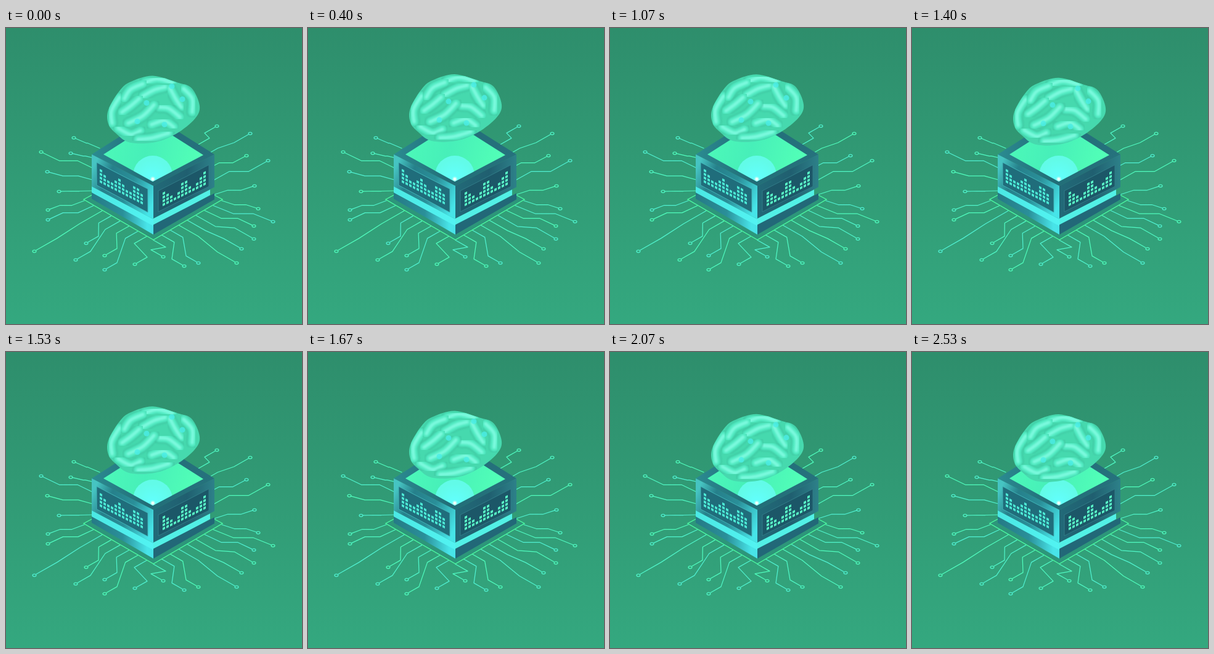
An HTML page that plays this animation: 480 px wide and 480 px high, repeating every 2590 ms.

```html
<!DOCTYPE html>
<html lang="en">
<head>
<meta charset="utf-8">
<title>Brain over a processor</title>
<style>
html, body { margin: 0; width: 100%; height: 100%; overflow: hidden; background: #319b76; }
svg { display: block; width: 100vw; height: 100vh; }
.line { fill: none; stroke-linecap: round; stroke-linejoin: round; }
</style>
</head>
<body>
<svg viewBox="0 0 480 480">
  <defs>
    <linearGradient id="bg" x2="0" y2="1">
      <stop stop-color="#2e8e6c"/><stop offset="1" stop-color="#34a87f"/>
    </linearGradient>
    <linearGradient id="rim">
      <stop stop-color="#2b8b91"/><stop offset=".45" stop-color="#226d78"/><stop offset="1" stop-color="#26727d"/>
    </linearGradient>
    <linearGradient id="left" y1=".25" y2=".75">
      <stop stop-color="#46c4c2"/><stop offset=".25" stop-color="#26808b"/>
      <stop offset=".6" stop-color="#2a8f99"/><stop offset="1" stop-color="#46e4e8"/>
    </linearGradient>
    <linearGradient id="right">
      <stop stop-color="#226a78"/><stop offset=".55" stop-color="#205f70"/><stop offset="1" stop-color="#2d8189"/>
    </linearGradient>
    <linearGradient id="strip">
      <stop stop-color="#4be8e4"/><stop offset="1" stop-color="#52f3f2"/>
    </linearGradient>
    <linearGradient id="slab">
      <stop stop-color="#257a86"/><stop offset=".5" stop-color="#2a8f99"/><stop offset=".9" stop-color="#48e4e8"/>
    </linearGradient>
    <linearGradient id="well" x2="1" y2=".2">
      <stop stop-color="#4dfbb8"/><stop offset=".5" stop-color="#47efb9"/><stop offset="1" stop-color="#52ffb7"/>
    </linearGradient>
    <radialGradient id="glow" cy=".6">
      <stop stop-color="#62ffff"/><stop offset="1" stop-color="#62fbe8"/>
    </radialGradient>
    <radialGradient id="spark">
      <stop stop-color="#fff"/><stop offset=".35" stop-color="#e7fff8"/><stop offset="1" stop-color="#9ffff0" stop-opacity="0"/>
    </radialGradient>
    <filter id="soft" x="-20%" y="-20%" width="140%" height="140%"><feGaussianBlur stdDeviation="1.5"/></filter>
    <clipPath id="opening"><path d="M158 205L238 154 320 206 238 249Z"/></clipPath>
    <clipPath id="skull"><path id="outline"/></clipPath>
  </defs>

  <rect width="480" height="480" fill="url(#bg)"/>
  <g id="wires" class="line" stroke-width="1.25"></g>
  <path d="M139 271L126 278 239 343.5 351 278 338 271" fill="#2d967a" stroke="#4dfba2" stroke-width="1.4"/>

  <path d="M139 205L238 142 338 205 239 256Z" fill="url(#rim)"/>
  <g clip-path="url(#opening)">
    <rect x="155" y="150" width="170" height="105" fill="url(#well)"/>
    <circle cx="238" cy="239" r="32" fill="url(#glow)"/>
    <circle cx="238" cy="245" r="5" fill="url(#spark)"/>
  </g>
  <path d="M139 205L239 256V310L139 257Z" fill="url(#left)"/>
  <path d="M139 257L239 310V322L139 267Z" fill="url(#strip)"/>
  <path d="M139 267L239 321V335L139 277Z" fill="url(#slab)"/>
  <path d="M239 256L338 205V258L239 309Z" fill="url(#right)"/>
  <path d="M239 309L331 262V271L239 321Z" fill="#52f0e6"/>
  <path d="M239 319L338 268V278L239 335Z" fill="#226878"/>
  <path d="M147 218L230 261V299L147 255Z" fill="#206d7b" stroke="#43b9bc" stroke-width=".9"/>
  <path d="M247 264L329 222V257L247 298Z" fill="#1c5768" stroke="#347f8b" stroke-width=".9"/>
  <g id="ledsL" transform="matrix(1 .51 0 1 152 228.5)" fill="#4ce9d5"></g>
  <g id="ledsR" transform="matrix(1 -.5 0 1 254 267)" fill="#58f6c6"></g>
  <g id="brain"></g>
</svg>

<script>
const LOOP = 2590, STEP = 200 / 3;
const $ = id => document.getElementById(id);
const lerp = (a, b, f) => a + (b - a) * f;
const parse = text => text.split(' ').map(p => p.split(',').map(Number));

function add(parent, tag, attrs) {
  const el = document.createElementNS('http://www.w3.org/2000/svg', tag);
  for (const key in attrs) el.setAttribute(key, attrs[key]);
  return parent.appendChild(el);
}

// Smooth curve through points
function curve(text, closed) {
  const pts = parse(text), n = pts.length;
  const at = i => closed ? pts[(i + n) % n] : pts[Math.max(0, Math.min(n - 1, i))];
  let d = 'M' + pts[0];
  for (let i = 0; i < (closed ? n : n - 1); i++) {
    const [a, b, c, e] = [at(i - 1), at(i), at(i + 1), at(i + 2)];
    const p = [0, 1].map(k => b[k] + (c[k] - a[k]) / 6);
    const q = [0, 1].map(k => c[k] - (e[k] - b[k]) / 6);
    d += `C${p} ${q} ${c}`;
  }
  return d + (closed ? 'Z' : '');
}

// A wire leaves its node and meets the board on isometric slants, joined by one middle leg
const wires = [];
function fan(nodes, from, to) {
  const ends = parse(nodes);
  ends.forEach(([x, y], i) => {
    const [ax, ay] = [0, 1].map(k => lerp(from[k], to[k], i / (ends.length - 1)));
    const run = Math.max(20, Math.abs(ax - x) / 3);
    const slope = Math.min(.57, Math.abs(ay - y) / run / 2);
    const u = run * Math.sign(ax - x), v = run * slope * Math.sign(ay - y);
    const g = add($('wires'), 'g', {});
    add(g, 'path', { d: `M${x + 3 * Math.sign(u)} ${y + v / run * 3}L${x + u} ${y + v} ${ax - u} ${ay - v} ${ax} ${ay}` });
    add(g, 'ellipse', { cx: x, cy: y, rx: 2.9, ry: 2 });
    wires.push(g);
  });
}
fan('110,178 105,203 57,201 67,233 86,265', [152, 195], [139, 264]);
fan('68,295 68,311 46,362 130,349 113,376 160,369 160,392 209,383', [127, 280], [228, 338]);
fan('342,159 396,171 390,207 425,215 403,256', [310, 190], [338, 270]);
fan('409,293 433,314 402,321 402,342 382,358 374,381 312,381 289,386 255,371', [350, 280], [239, 344]);

// Four-row bars of lamps; height gives the lit rows of a column
function bars(group, height) {
  for (let x = 0; x < 12; x++)
    for (let y = 4 - Math.round(height(x)); y < 4; y++)
      add(group, 'rect', { x: x * 6, y: y * 6, width: 4, height: 4 });
}
bars($('ledsL'), x => 3 + Math.cos(x * 1.3));
bars($('ledsR'), x => 2.6 + 1.4 * Math.cos(x * 1.15));

const brain = $('brain');
const shape = curve('166,153 166,130 186,97 204,84 238,75 278,86 301,95 314,124 306,145 276,169 240,183 200,183 178,168', true);
$('outline').setAttribute('d', shape);
add(brain, 'path', { d: shape, fill: '#46d9ae' });
const inner = add(brain, 'g', { 'clip-path': 'url(#skull)' });

// Each ridge is a tube: shaded edge, light body, bright crest
const ridges = [
  '172,152 171,132 184,110', '225,86 245,80 270,86', '192,112 202,97 222,88',
  '288,96 302,112 302,134', '222,108 240,98 258,93', '266,95 275,112 284,126',
  '188,134 202,124 216,112', '248,126 264,128 282,142', '198,152 222,140 240,122',
  '236,154 256,148 272,158', '182,160 202,170 218,164', '214,178 236,176 264,168'
];
for (const ridge of ridges) {
  const g = add(inner, 'g', { class: 'line', filter: 'url(#soft)' });
  const d = curve(ridge);
  for (const [color, width, opacity] of [['#32b190', 18, .6], ['#51ebc2', 14, 1], ['#8dffe9', 5, .75]])
    add(g, 'path', { d, stroke: color, 'stroke-width': width, opacity });
}
for (const [cx, cy] of parse('213,149 257,154 286,113 269,92 228,119'))
  add(inner, 'circle', { cx, cy, r: 4.5, fill: '#4beee8', opacity: .8 });

// The brain settles upward, hovers, then sinks towards the box
function height(t) {
  const settle = 2.5 * Math.max(0, 1 - t / 500) ** 2;
  return settle + 26 / (1 + Math.exp((1530 - t) / 105));
}

function draw() {
  const now = Math.floor(performance.now() % LOOP / 10) * 10;
  const t = Math.floor((now + 5) / STEP) * STEP;
  brain.setAttribute('transform', `translate(0 ${height(t).toFixed(2)})`);
  wires.forEach((g, i) => {
    const mix = .5 + .5 * Math.sin(t / LOOP * Math.PI * 2 + i * 2.4);
    g.setAttribute('stroke', `rgb(80,${lerp(252, 240, mix)},${lerp(188, 210, mix)})`);
  });
  requestAnimationFrame(draw);
}
draw();
</script>
</body>
</html>
```
